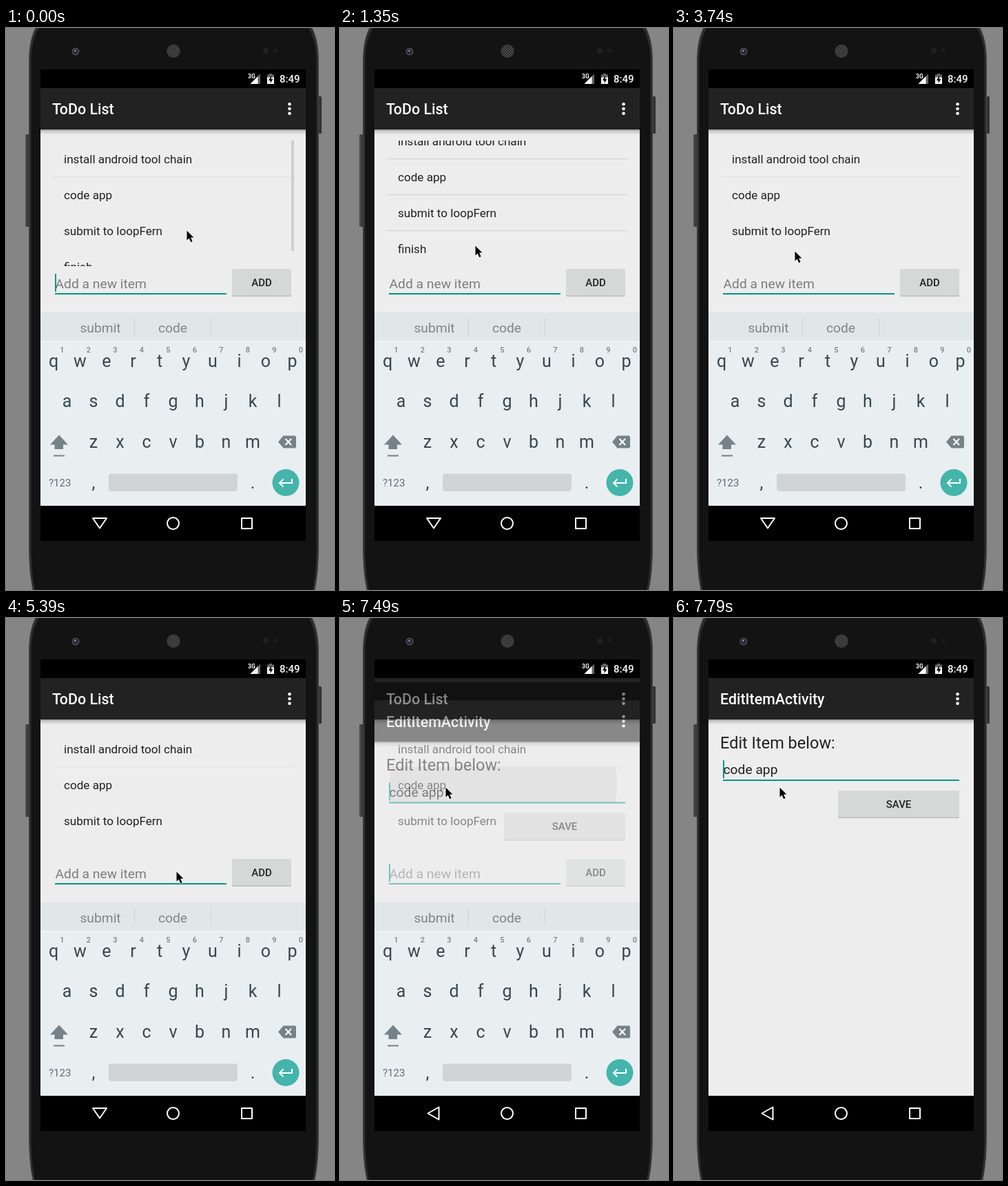
An HTML page that plays this animation: 476 px wide and 814 px high, repeating every 8 s.

```html
<!DOCTYPE html>
<html lang="en">
<head>
<meta charset="utf-8">
<title>ToDo List</title>
<style>
html, body { margin: 0; height: 100%; overflow: hidden; background: #858585; }
svg { display: block; width: 100%; height: 100%; font-family: Roboto, sans-serif; }
text { white-space: pre; }
.title { font-size: 21.4px; font-weight: 500; fill: #fff; }
.row { font-size: 17.1px; fill: #212121; }
.field { font-size: 19.25px; }
.btn { font-size: 15px; font-weight: 500; fill: #222; text-anchor: middle; }
.hint { font-size: 19.25px; fill: #7b878c; text-anchor: middle; }
.keys { font-size: 25px; fill: #37474f; text-anchor: middle; }
.nums { font-size: 11px; font-weight: 500; fill: #75838a; text-anchor: middle; }
.accent { fill: #009688; }
.nav { fill: none; stroke: #fff; stroke-width: 2; stroke-linejoin: round; }

.anim { animation: 8s step-end infinite; }
#pointer { animation-name: pointer; }
#list { animation-name: scroll; }
#lines { animation-name: lines; }
#last { animation-name: last; }
#bar { animation-name: bar; }
#glow { animation-name: glow; transform-origin: 0 345px; }
#press { animation-name: press; }
#tap { animation-name: tap; }
#caret { animation-name: caret; }
#edit { animation-name: edit; }
#keyboard { animation-name: keyboard; }
#down { animation-name: down; }
#back { animation-name: back; }

@keyframes pointer {
  0% { transform: translate(262px, 293px) }
  1.875% { transform: translate(262px, 292px) }
  3.75% { transform: translate(261px, 283px) }
  5.625% { transform: translate(260px, 258px) }
  7.5% { transform: translate(257px, 221px) }
  9.375% { transform: translate(255px, 197px) }
  11.25% { transform: translate(251px, 222px) }
  13.125% { transform: translate(232px, 276px) }
  15% { transform: translate(213px, 301px) }
  16.875% { transform: translate(196px, 315px) }
  18.75% { transform: translate(186px, 319px) }
  20.625% { transform: translate(181px, 319px) }
  22.375% { transform: translate(179px, 319px) }
  46.75% { transform: translate(175px, 323px) }
  48.625% { transform: translate(214px, 341px) }
  50.5% { transform: translate(282px, 360px) }
  52.375% { transform: translate(341px, 368px) }
  54.25% { transform: translate(360px, 369px) }
  59.875% { transform: translate(302px, 368px) }
  61.75% { transform: translate(247px, 367px) }
  76.75% { transform: translate(222px, 310px) }
  78.625% { transform: translate(182px, 236px) }
  80.5% { transform: translate(158px, 197px) }
  82.375%, 100% { transform: translate(153px, 245px) }
}
@keyframes scroll {
  0% { transform: none }
  3.75% { transform: translateY(-3px) }
  5.625% { transform: translateY(-20px) }
  7.5% { transform: translateY(-26px) }
  39.25%, 100% { transform: none }
}
@keyframes lines {
  0% { opacity: 0 }
  3.75% { opacity: 1 }
  39.25%, 100% { opacity: 0 }
}
@keyframes last {
  0% { opacity: 1 }
  39.25%, 100% { opacity: 0 }
}
@keyframes bar {
  0% { opacity: .35; transform: none }
  1.875% { opacity: .1; transform: none }
  3.75% { opacity: 1; transform: translateY(3px) }
  5.625% { opacity: 1; transform: translateY(18px) }
  7.5% { opacity: 1; transform: translateY(23px) }
  11.25% { opacity: .5; transform: translateY(23px) }
  13.125%, 100% { opacity: 0 }
}
@keyframes glow {
  0% { opacity: 0 }
  7.5% { opacity: .7; transform: scaleY(.55) }
  9.375% { opacity: 1; transform: none }
  11.25% { opacity: .5; transform: scaleY(.6) }
  13.125%, 100% { opacity: 0 }
}
@keyframes press {
  0% { r: 0 }
  33.625% { r: 22px }
  35.5% { r: 40px }
  39.25%, 100% { r: 0 }
}
@keyframes tap {
  0% { r: 0; cx: 154px }
  91.75% { r: 45px; cx: 160px }
  93.625% { r: 165px; cx: 237px }
  95.5%, 100% { r: 0; cx: 237px }
}
@keyframes caret {
  0%, 7.5%, 22.375%, 33.625%, 48.625%, 59.875%, 73%, 86.125%, 100% { opacity: 1 }
  1.875%, 15%, 28%, 41.125%, 54.25%, 67.375%, 80.5% { opacity: 0 }
}
@keyframes edit {
  0% { opacity: 0 }
  93.625% { opacity: .5; transform: translateY(32.5px) }
  95.5% { opacity: 1; transform: translateY(5px) }
  97.375%, 100% { opacity: 1; transform: none }
}
@keyframes keyboard {
  0% { opacity: 1 }
  95.5% { opacity: .3; transform: translateY(20px) }
  97.375%, 100% { opacity: 0 }
}
@keyframes down {
  0% { opacity: 1 }
  93.625%, 100% { opacity: 0 }
}
@keyframes back {
  0% { opacity: 0 }
  93.625%, 100% { opacity: 1 }
}
</style>
</head>
<body>
<svg viewBox="0 0 476 814">
  <defs>
    <clipPath id="screen"><path d="M50 60h385v632H50z"/></clipPath>
    <clipPath id="view"><path d="M67 163h351v182H67z"/></clipPath>
    <clipPath id="codeRow"><path d="M67 215h351v52H67z"/></clipPath>
    <clipPath id="lastRow"><path d="M67 294h351v51H67z"/></clipPath>
    <linearGradient id="shade" x2="0" y2="1">
      <stop stop-opacity=".32"/><stop offset=".4" stop-opacity=".12"/><stop offset="1" stop-opacity="0"/>
    </linearGradient>
    <linearGradient id="side">
      <stop stop-color="#555"/><stop offset="1" stop-color="#222"/>
    </linearGradient>
    <pattern id="mesh" width="3.6" height="3.6" patternUnits="userSpaceOnUse">
      <path fill="#555" d="M0 0h3.6v3.6H0z"/><circle cx="1" cy="1" r=".95" fill="#151515"/><circle cx="2.8" cy="2.8" r=".95" fill="#151515"/>
    </pattern>
    <g id="dots" fill="#fff"><circle cx="411.5" cy="110.3" r="2.3"/><circle cx="411.5" cy="117" r="2.3"/><circle cx="411.5" cy="123.7" r="2.3"/></g>
  </defs>

  <!-- phone body -->
  <path fill="#858585" d="M0 0h476v814H0z"/>
  <rect x="28" y="154" width="7" height="134" rx="1.5" fill="url(#side)"/>
  <rect x="451" y="99" width="7" height="54" rx="1.5" fill="#333"/>
  <path fill="#2c2c2c" stroke="#484848" d="M45 -4C37 10 33.5 26 33.5 50V745C33.5 775 35 797 40 818H447C452 797 453.5 775 453.5 745V50C453.5 26 450 10 442 -4Z"/>
  <path fill="#131313" d="M50 -4C40 12 36.5 28 36.5 50V745C36.5 775 38 797 43 818H444C449 797 450.5 775 450.5 745V50C450.5 28 447 12 437 -4Z"/>
  <circle cx="101" cy="34" r="5.5" fill="#4a4a4c"/>
  <circle cx="101" cy="34" r="3.6" fill="#20222e"/>
  <circle cx="100.5" cy="33" r="1.5" fill="#8288ac"/>
  <circle cx="243" cy="33.5" r="9.7" fill="url(#mesh)"/>
  <circle cx="377" cy="33" r="4.2" fill="#202020"/>
  <circle cx="391" cy="32.5" r="3" fill="#1d1d1d"/>
  <path d="M50 60h385v683H50z"/>

  <g clip-path="url(#screen)">
    <!-- list window -->
    <path fill="#ededed" d="M50 147h385v545H50z"/>
    <path fill="#222" d="M50 87h385v60H50z"/>
    <path fill="url(#shade)" d="M50 147h385v8H50z"/>
    <text class="title" x="67" y="125">ToDo List</text>
    <use href="#dots"/>
    <g clip-path="url(#lastRow)"><circle id="press" class="anim" cx="180" cy="320" r="0" fill-opacity=".1"/></g>
    <g clip-path="url(#codeRow)"><circle id="tap" class="anim" cx="154" cy="241" r="0" fill-opacity=".08"/></g>
    <g clip-path="url(#view)">
      <g id="list" class="anim">
        <path fill="#e0e0e0" d="M67 215h351v1H67z"/>
        <path id="lines" class="anim" fill="#d0d0d0" d="M67 215h351v1H67zM67 267h351v1H67zM67 319h351v1H67z"/>
        <g class="row">
          <text x="84" y="195.7">install android tool chain</text>
          <text x="84" y="247.7">code app</text>
          <text x="84" y="299.7">submit to loopFern</text>
          <text id="last" class="anim" x="84" y="351.7">finish</text>
        </g>
      </g>
      <path id="bar" class="anim" fill="#999" d="M414 163h4v160h-4z"/>
      <path id="glow" class="anim" fill-opacity=".2" d="M67 345V331Q242 306.5 418 328V345Z"/>
    </g>
    <text class="field" x="71.5" y="376.5" fill="#7c7c7c">Add a new item</text>
    <path class="accent" d="M71 384h249v2H71z"/>
    <path id="caret" class="accent anim" d="M71 356h2v26h-2z"/>
    <rect x="328" y="350" width="86" height="39" rx="2" fill="#bbb"/>
    <rect x="328" y="349" width="86" height="38.5" rx="2" fill="#d6d7d7"/>
    <text class="btn" x="371" y="374">ADD</text>

    <!-- edit window -->
    <g id="edit" class="anim">
      <path d="M50 60h385v27H50z"/>
      <path fill="#ededed" d="M50 147h385v545H50z"/>
      <path fill="#222" d="M50 87h385v60H50z"/>
      <path fill="url(#shade)" d="M50 147h385v8H50z"/>
      <text class="title" x="67" y="125">EditItemActivity</text>
      <use href="#dots"/>
      <text x="67" y="188.5" font-size="23.5" fill="#212121">Edit Item below:</text>
      <text class="field" x="71.5" y="226" fill="#212121">code app</text>
      <path class="accent" d="M71 234h343v2H71zM71 206h2v26h-2z"/>
      <rect x="238" y="251" width="176" height="39" rx="2" fill="#bbb"/>
      <rect x="238" y="250" width="176" height="38.5" rx="2" fill="#d6d7d7"/>
      <text class="btn" x="326" y="274.5">SAVE</text>
    </g>

    <!-- keyboard -->
    <g id="keyboard" class="anim">
      <path fill="#e9eef1" d="M50 412h385v280H50z"/>
      <path fill="#e1e6e9" d="M50 412h385v41H50z"/>
      <path fill="#f2f5f7" d="M50 453h385v1.5H50z"/>
      <path fill="#ccd2d5" d="M186 420h1v26h-1zM297 420h1v26h-1z"/>
      <text class="hint" x="137" y="440.5">submit</text>
      <text class="hint" x="242" y="440.5">code</text>
      <text class="nums" y="470" x="81.5 120 158.5 197 235.5 274 312.5 351 389.5 428">1234567890</text>
      <g class="keys">
        <text y="490.5" x="69 107.5 146 184.5 223 261.5 300 338.5 377 415.5">qwertyuiop</text>
        <text y="549" x="88.5 127 165.5 204 242.5 281 319.5 358 396.5">asdfghjkl</text>
        <text y="607.5" x="127 165.5 204 242.5 281 319.5 358">zxcvbnm</text>
        <text y="667" x="127 358">,.</text>
      </g>
      <text x="62" y="664" font-size="15" fill="#5f6e75">?123</text>
      <g fill="#758389">
        <path d="M64 603.5 77 589.5 90 603.5H83V610H70.500V603.500ZM69 618.500h16v2H69z"/>
        <path d="M395 599.500 402.500 590.500H419Q421 590.500 421 592.500V606.500Q421 608.500 419 608.500H402.500Z"/>
      </g>
      <path fill="none" stroke="#fff" stroke-width="2" d="M405.500 595 414 604M414 595 405.500 604"/>
      <rect x="149" y="645.500" width="187" height="25.500" rx="4" fill="#d0d4d7"/>
      <circle cx="406" cy="658.500" r="19.500" fill="#45b5ab"/>
      <path fill="none" stroke="#fff" stroke-width="2" d="M415 653V659H397.500M402.500 653.500 397 659 402.500 664.500"/>
    </g>
  </g>

  <!-- status bar -->
  <text x="351" y="73" font-size="8.500" font-weight="700" fill="#fff">3G</text>
  <path fill="#666" d="M354.500 81H369V66.500Z"/>
  <path fill="#fff" d="M354.500 81H365.500V70Z"/>
  <path fill="#666" d="M382 66h4v1.500h3v5h-10v-5h3z"/>
  <path fill="#fff" d="M379 71.500h10V81h-10z"/>
  <path d="M385 69 381 76h2.600v4L387.500 74H385Z"/>
  <text x="397" y="79.300" font-size="15" font-weight="500" fill="#fff">8:49</text>

  <!-- navigation bar -->
  <g class="nav">
    <path id="down" class="anim" d="M126 710h20L136 724.500Z"/>
    <path id="back" class="anim" d="M143.500 708.500v18L127.500 717.500Z"/>
    <circle cx="242.500" cy="717.500" r="8.500"/>
    <path d="M342 710h15v15h-15z"/>
  </g>

  <path id="pointer" class="anim" stroke="#fff" stroke-width="1.200" paint-order="stroke" d="M.500 .500V14.500L3.700 11.500 6.200 17.200 8.600 16.100 6.100 10.600H10.500Z"/>
</svg>
</body>
</html>
```
